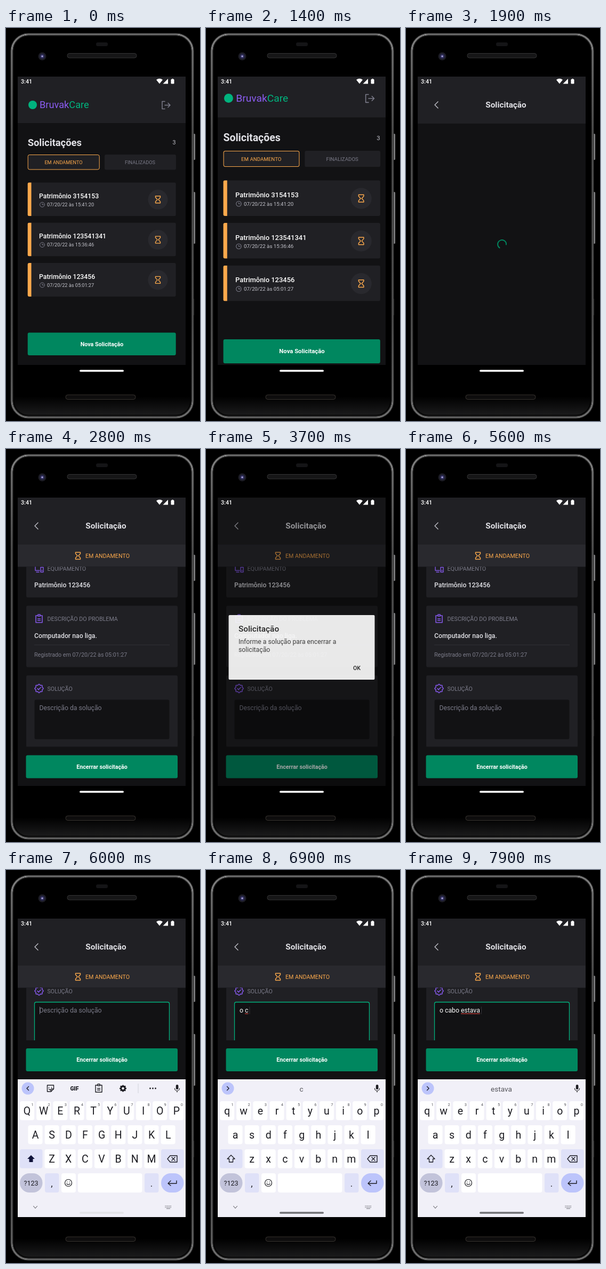
Animation of 364x736 px, one loop 8 s. Source, as an HTML page with a canvas:

```html
<!DOCTYPE html>
<html lang="pt">
<head>
<meta charset="utf-8">
<title>Solicitações</title>
<style>
html, body { margin: 0; width: 100%; height: 100%; overflow: hidden; background: #000; }
canvas { display: block; width: 364px; height: 736px; }
</style>
</head>
<body>
<canvas id="stage"></canvas>
<script>
const W = 364, H = 736, LOOP = 8000;
const canvas = document.getElementById('stage');
const ctx = canvas.getContext('2d');
const dpr = window.devicePixelRatio || 1;
canvas.width = W * dpr;
canvas.height = H * dpr;

const C = {
  bg: '#121214', panel: '#202024', raised: '#29292e', muted: '#7c7c8a',
  soft: '#c4c4cc', text: '#e1e1e6', white: '#fff', orange: '#fba94c',
  green: '#00875f', lime: '#00b37e', purple: '#8257e5',
  kb: '#f1f0f8', key: '#fff', mod: '#dfe1f8', accent: '#bcc4fb', ink: '#1b1b21'
};
// type sizes
const XS = 9.18, SM = 10.7, MD = 12.24, XL = 15.3, XXL = 18.36;

const SCREEN = { x: 22, y: 91, w: 315, h: 540 };
const clamp = v => Math.max(0, Math.min(1, v));
const span = (t, start, length) => clamp((t - start) / length);
const easeOut = u => 1 - Math.pow(1 - u, 3);

function box(x, y, w, h, r, fill, stroke, lw = 1) {
  ctx.beginPath();
  ctx.roundRect(x, y, w, h, r);
  if (fill) { ctx.fillStyle = fill; ctx.fill(); }
  if (stroke) { ctx.strokeStyle = stroke; ctx.lineWidth = lw; ctx.stroke(); }
}

function disc(x, y, r, fill) {
  ctx.beginPath();
  ctx.arc(x, y, r, 0, 7);
  ctx.fillStyle = fill;
  ctx.fill();
}

// y is the middle of the capital letters
function text(s, x, y, size, color, weight = 400, align = 'left') {
  ctx.font = `${weight} ${size}px Roboto, sans-serif`;
  ctx.textAlign = align;
  ctx.fillStyle = color;
  ctx.fillText(s, x, y + size * 0.355);
  return ctx.measureText(s).width;
}

function icon(d, x, y, color, lw = 1.4, filled = false) {
  const path = typeof d === 'string' ? new Path2D(d) : d;
  ctx.save();
  ctx.translate(x, y);
  ctx.lineWidth = lw;
  ctx.lineJoin = ctx.lineCap = 'round';
  ctx.strokeStyle = ctx.fillStyle = color;
  if (filled) ctx.fill(path);
  else ctx.stroke(path);
  ctx.restore();
}

function clipped(x, y, w, h, draw) {
  ctx.save();
  ctx.beginPath();
  ctx.rect(x, y, w, h);
  ctx.clip();
  draw();
  ctx.restore();
}

function scaled(s, alpha, draw) {
  ctx.save();
  ctx.globalAlpha = alpha;
  ctx.translate(180, 358);
  ctx.scale(s, s);
  ctx.translate(-180, -358);
  draw();
  ctx.restore();
}

const ICON = {
  glass: 'M-4.5-6.5H4.5V-4L1 0L4.5 4V6.5H-4.5V4L-1 0L-4.5-4Z',
  exit: 'M-2-7H-7V7H-2M-2 0H7M4-4L8 0L4 4',
  desktop: 'M1 4H-7V-6H6V-4M-5 7H0M3-2H8V7H3ZM5 4H6',
  board: 'M-2-6H-6V7H6V-6H2M-2-8H2V-5H-2ZM-2.5 0H2.5M-2.5 3H2.5',
  clock: 'M4.5 0A4.5 4.5 0 1 1-4.5 0A4.5 4.5 0 1 1 4.5 0M0-2V0H2.5',
  check: 'M-3 0L-1 2.3L3.2-2',
  left: 'M3-6L-3 0L3 6',
  shift: 'M0-7L7 0H3.5V6H-3.5V0H-7Z',
  erase: 'M-9 0L-4-6H9V6H-4ZM-1-3L5 3M5-3L-1 3',
  enter: 'M8-4V1H-7M-3-4L-8 1L-3 5',
  smile: 'M6.5 0A6.5 6.5 0 1 1-6.5 0A6.5 6.5 0 1 1 6.5 0M-3 1.5Q0 5 3 1.5M-2.3-2V-1.5M2.3-2V-1.5',
  sticker: 'M6 1V-6H-6V6H1ZM1 6V1H6M-3-2V-1.5M2-2V-1.5M-3 1Q-2 3 0 3',
  mic: 'M-4.5 0A4.5 4.5 0 0 0 4.5 0M0 4.5V7'
};

const seal = new Path2D();
for (let i = 0; i <= 64; i++) {
  const a = i / 64 * Math.PI * 2, r = 7.2 + 0.8 * Math.cos(8 * a);
  seal.lineTo(r * Math.cos(a), r * Math.sin(a));
}
seal.closePath();

function vertical(y0, y1, ...colors) {
  const g = ctx.createLinearGradient(0, y0, 0, y1);
  colors.forEach((c, i) => g.addColorStop(i / (colors.length - 1), c));
  return g;
}

// metal rim: rings that brighten, then fade inwards
function rim() {
  box(9, 10, 343, 721, 33, vertical(690, 731, '#000', '#202021'));
  for (let i = 0; i < 7; i++) {
    const glow = Math.exp(-Math.pow((i - 2) / 1.9, 2));
    const gray = v => `rgb(${v * glow},${v * glow},${v * glow})`;
    const metal = vertical(10, 731, gray(165), gray(108), gray(108), gray(108), gray(140));
    box(9 + i, 10 + i, 343 - 2 * i, 721 - 2 * i, 33 - i, null, metal, 1.2);
  }
}

function phone() {
  ctx.fillStyle = '#000';
  ctx.fillRect(0, 0, W, H);
  box(350, 198, 5, 49, 1.5, '#868688');
  box(350, 307, 5, 97, 1.5, '#868688');
  box(350, 507, 3, 31, 1, '#4a4a4c');
  rim();
  box(169, 27, 22, 7, 3, '#141416');
  box(115, 47.5, 130, 8.5, 4, '#161617', '#343435');
  box(112, 687, 131, 8.5, 4, '#0e0d0d', '#37332f');
  disc(68, 53, 7.5, '#1c1c25');
  disc(68, 53, 4.5, '#2c2b55');
  disc(68, 53, 1.8, '#a9a3dc');
}

function statusBar() {
  text('3:41', 28, 100, SM, C.white, 500);
  icon('M-6-3Q0-7.5 6-3L0 4.5Z', 288, 100, C.white, 1, true);
  icon('M5-5V4.5H-4.5Z', 299, 100, C.white, 1, true);
  box(309.5, 96, 6, 8.5, 1, C.white);
  box(311, 95, 3, 2, 0, C.white);
}

function button(label, x, y, w, h) {
  box(x, y, w, h, 3, C.green);
  text(label, 180, y + h / 2, SM, C.white, 700, 'center');
}

function ticket(y, id, time) {
  ctx.save();
  ctx.beginPath();
  ctx.roundRect(40.7, y, 278, 63, 3);
  ctx.clip();
  box(40, y, 280, 63, 0, C.panel);
  box(40, y, 7.5, 63, 0, C.orange);
  ctx.restore();
  text('Patrimônio ' + id, 62, y + 25.5, MD, C.white, 500);
  icon(ICON.clock, 68, y + 41.5, C.muted, 1);
  text('07/20/22 às ' + time, 77, y + 41.5, XS, C.soft);
  disc(285, y + 32, 18.5, C.raised);
  icon(ICON.glass, 285, y + 32, C.orange);
}

function home() {
  ctx.fillStyle = C.bg;
  ctx.fillRect(22, 80, 315, 570);
  ctx.fillStyle = C.panel;
  ctx.fillRect(22, 60, 315, 118);
  disc(50, 144, 8, C.lime);
  const w = text('Bruvak', 63, 144, 18.2, '#8a5cf0');
  text('Care', 63 + w, 144, 18.2, C.lime);
  icon(ICON.exit, 300, 144.5, C.muted, 1.5);
  text('Solicitações', 40.7, 214, XXL, C.text, 700);
  text('3', 318.5, 214.5, SM, C.soft, 400, 'right');
  box(41.2, 237.5, 134, 27.5, 3, C.panel, C.orange);
  text('EM ANDAMENTO', 108, 251.5, XS, C.orange, 400, 'center');
  box(185, 237, 134, 28.5, 3, C.panel);
  text('FINALIZADOS', 251.5, 251.5, XS, C.muted, 400, 'center');
  ticket(289.3, '3154153', '15:41:20');
  ticket(364.6, '123541341', '15:36:46');
  ticket(439.9, '123456', '05:01:27');
  button('Nova Solicitação', 40.7, 570.5, 278, 42.5);
}

function section(y, h, name, draw) {
  box(38, y, 284, h, 3, C.panel);
  text(name, 77.5, y + 25, SM, C.muted);
  draw(62, y + 24.5);
}

function cards(focused, typed) {
  section(199, 79, 'EQUIPAMENTO', (x, y) => icon(ICON.desktop, x, y, C.purple));
  text('Patrimônio 123456', 53, 254.5, MD, C.text, 500);
  section(293.5, 115, 'DESCRIÇÃO DO PROBLEMA', (x, y) => icon(ICON.board, x, y, C.purple, 1.6));
  text('Computador nao liga.', 53, 349.5, MD, C.text, 500);
  ctx.fillStyle = '#323238';
  ctx.fillRect(53, 366.5, 254, 0.9);
  text('Registrado em 07/20/22 às 05:01:27', 53, 385.5, SM, C.muted);
  section(424, 135, 'SOLUÇÃO', (x, y) => {
    icon(seal, x, y, C.purple, 1.6);
    icon(ICON.check, x, y, C.purple, 1.6);
  });
  box(53.5, 469.5, 253, 74, 3, C.bg, focused && C.lime, 1.3);
  if (!typed) text('Descrição da solução', 62.5, 485, MD, C.muted);
  let cursor = 63;
  if (typed) {
    const start = typed.lastIndexOf(' ') + 1;
    cursor += text(typed, 63, 485, MD, C.white);
    const from = 63 + ctx.measureText(typed.slice(0, start)).width;
    ctx.fillStyle = '#d8453f';
    ctx.fillRect(from, 490.5, cursor - from, 1.2);
    cursor += 2;
  }
  if (focused) {
    ctx.fillStyle = typed ? '#34343a' : C.muted;
    ctx.fillRect(cursor, 478, 1, 14);
  }
}

function detail(t, typed) {
  ctx.fillStyle = C.bg;
  ctx.fillRect(22, 91, 315, 540);
  ctx.fillStyle = C.panel;
  ctx.fillRect(22, 91, 315, 88);
  icon(ICON.left, 57, 144, C.soft);
  text('Solicitação', 187.5, 143.8, XL, C.text, 700, 'center');

  if (t < 2000) {
    const a = t / 130;
    ctx.beginPath();
    ctx.arc(180, 405, 8, a, a + 4.4);
    ctx.strokeStyle = C.green;
    ctx.lineWidth = 2;
    ctx.stroke();
    return;
  }
  ctx.fillStyle = C.raised;
  ctx.fillRect(22, 179, 315, 41.5);
  icon(ICON.glass, 135, 200, C.orange);
  text('EM ANDAMENTO', 149, 200.5, SM, C.orange);

  const resized = t >= 5850;
  const shift = resized ? -222 : 37 * (1 - easeOut(span(t, 2710, 90)));
  clipped(22, 220.5, 315, resized ? 98.5 : 337, () => {
    ctx.translate(0, shift);
    cards(t >= 5800, typed);
  });
  button('Encerrar solicitação', 37.5, resized ? 334 : 573.5, 284.5, 43);
}

function dialog(t) {
  const closing = 1 - span(t, 4960, 200);
  const shown = Math.min(span(t, 3475, 250), closing);
  const dim = 0.55 * Math.min(span(t, 3480, 350), closing);
  if (!shown) return;
  ctx.fillStyle = `rgba(0,0,0,${dim})`;
  ctx.fillRect(SCREEN.x, SCREEN.y, SCREEN.w, SCREEN.h);
  const rise = t < 4500 ? (1 - shown) * 28 : 0;
  ctx.save();
  ctx.globalAlpha = shown;
  ctx.translate(0, rise);
  box(42.5, 308.3, 274, 121, 2, '#fff');
  text('Solicitação', 61, 333.5, XL, '#111', 500);
  text('Informe a solução para encerrar a', 61, 358, MD, '#2c2c2c');
  text('solicitação', 61, 372.5, MD, '#2c2c2c');
  text('OK', 283, 407.5, SM, '#111', 500, 'center');
  ctx.restore();
}

function toolbar(typed) {
  const y = 409;
  disc(41, y, 11.5, C.accent);
  icon(typed ? 'M-1.5-3.5L2 0L-1.5 3.5' : 'M1.5-3.5L-2 0L1.5 3.5', 41, y, C.ink);
  box(318.8, y - 7, 4.6, 9, 2.3, C.ink);
  icon(ICON.mic, 321, y, C.ink, 1.2);
  if (typed) {
    text(typed.split(' ').pop(), 179, y + 1, 13.6, '#55555b', 400, 'center');
    return;
  }
  icon(ICON.sticker, 83.5, y, C.ink);
  text('GIF', 128.5, y, 10.5, C.ink, 900, 'center');
  icon(ICON.board, 174, y, C.ink);
  for (let i = 0; i < 8; i++) {
    const a = i * Math.PI / 4;
    disc(219.5 + 5 * Math.cos(a), y + 5 * Math.sin(a), 1.6, C.ink);
  }
  ctx.beginPath();
  ctx.arc(219.5, y, 3.7, 0, 7);
  ctx.strokeStyle = C.ink;
  ctx.lineWidth = 2.8;
  ctx.stroke();
  ctx.fillStyle = '#d2d2da';
  ctx.fillRect(247.5, 400, 1, 18);
  [270.5, 275.5, 280.5].forEach(x => disc(x, y, 1.4, C.ink));
}

function keyRow(letters, x, y) {
  [...letters].forEach((c, i) => {
    const cx = x + i * 31.15;
    box(cx - 13.5, y, 27, 35.5, 4, C.key);
    text(c, cx, y + 18.5, 19.5, C.ink, 400, 'center');
  });
}

function keyboard(t, typed) {
  const slide = 258 * (1 - easeOut(span(t, 5790, 170)));
  if (slide >= 258) return;
  const upper = t < 6300;
  const name = s => upper ? s.toUpperCase() : s;
  clipped(22, 392, 315, 258, () => {
    ctx.translate(0, slide);
    ctx.fillStyle = C.kb;
    ctx.fillRect(22, 392, 315, 258);
    toolbar(typed);
    keyRow(name('qwertyuiop'), 39.5, 433);
    for (let i = 0; i < 10; i++) {
      text((i + 1) % 10, 49.5 + i * 31.15, 439, 7.5, '#55555d', 400, 'center');
    }
    keyRow(name('asdfghjkl'), 55, 478);
    keyRow(name('zxcvbnm'), 86, 523);
    box(26, 523, 42.5, 35.5, 4, C.mod);
    icon(ICON.shift, 47, 541, upper ? '#10133a' : C.ink, 1.3, upper);
    box(291, 523, 42.5, 35.5, 4, C.mod);
    icon(ICON.erase, 312, 541, C.ink);

    box(26, 568, 42.5, 36, 18, '#c2c3da');
    text('?123', 47, 586.5, 12.5, C.ink, 400, 'center');
    box(73, 568, 26.5, 36, 4, C.mod);
    text(',', 86, 587, 17, C.ink, 400, 'center');
    box(104, 568, 27, 36, 4, C.key);
    icon(ICON.smile, 117, 586, C.ink, 1.2);
    box(135, 568, 120.5, 36, 4, C.key);
    box(260, 568, 26.5, 36, 4, C.mod);
    text('.', 273, 587, 17, C.ink, 400, 'center');
    box(291, 568, 42.5, 36, 18, C.accent);
    icon(ICON.enter, 312, 586, C.ink);

    icon('M-3.5-2L0 2L3.5-2', 55, 631.5, '#6b6b72', 1.1);
    for (let i = 0; i < 10; i++) {
      box(298.5 + (i % 5) * 2.5, 628.5 + (i > 4 ? 2.5 : 0), 1.4, 1.4, 0, '#85858c');
    }
    box(301, 633.5, 7, 1.2, 0, '#85858c');
  });
}

function navPill(t) {
  let color = C.white;
  if (t >= 5850) {
    const v = Math.round(229 - 117 * span(t, 6000, 200));
    color = `rgb(${v},${v},${v + 4})`;
  }
  box(138, 640.2, 83, 3.6, 1.8, color);
}

function draw(t) {
  const typed = 'o cabo estava'.slice(0, Math.max(0, Math.floor((t - 6700) / 100) + 1));
  ctx.setTransform(dpr, 0, 0, dpr, 0, 0);
  phone();
  clipped(SCREEN.x, SCREEN.y, SCREEN.w, SCREEN.h, () => {
    const open = easeOut(span(t, 1340, 400));
    const fade = span(t, 1405, 83);
    if (fade < 1) scaled(1 + 0.15 * open, 1, home);
    else { ctx.fillStyle = C.bg; ctx.fillRect(22, 91, 315, 540); }
    if (fade > 0) scaled(0.85 + 0.15 * open, fade, () => detail(t, typed));
    dialog(t);
    statusBar();
  });
  keyboard(t, typed);
  navPill(t);
}

function tick() {
  draw(performance.now() % LOOP);
  requestAnimationFrame(tick);
}
tick();
</script>
</body>
</html>
```
